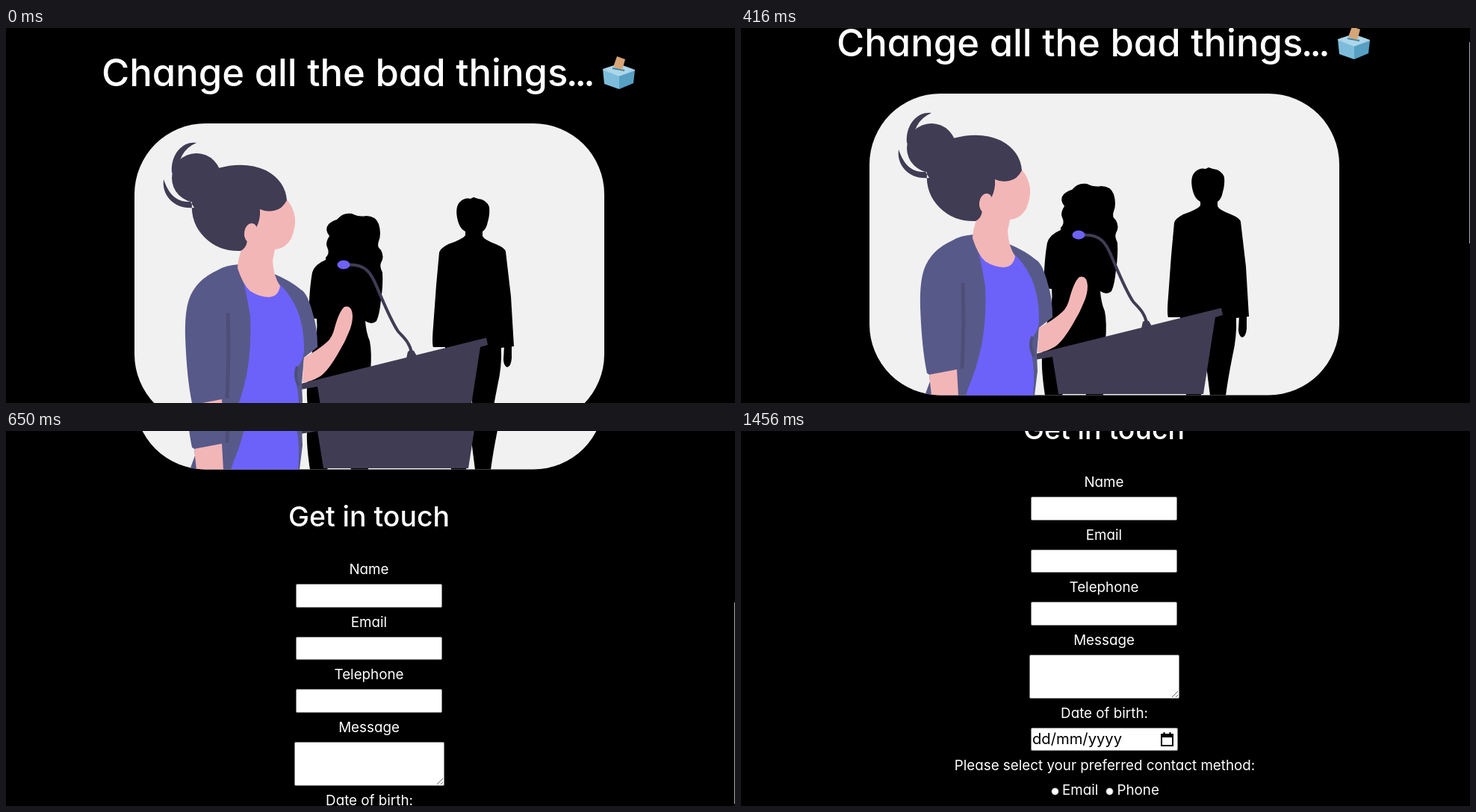
Recreate the animation shown at these times as an HTML page with a canvas. Size 976x503 px, loop 1.82 s.

```html
<!DOCTYPE html>
<html lang="en">
<head>
<meta charset="utf-8">
<title>Contact page scroll</title>
<style>
  html, body { margin: 0; width: 100%; height: 100%; overflow: hidden; background: #000; }
  #stage { position: relative; width: 976px; height: 503px; overflow: hidden; }
  #page, #page > * { position: absolute; left: 0; top: 0; }
  #thumb { position: absolute; left: 975px; top: 0; width: 1px; height: 270px; background: #aaa; }
  text {
    font: 400 18.8px Inter, "Open Sans", sans-serif;
    font-feature-settings: "cv11";
    font-optical-sizing: none;
    fill: #fff;
  }
  .mid { text-anchor: middle; }
  .title { font-size: 50.8px; font-weight: 500; }
  .dots { letter-spacing: -.075em; }
  .heading { font-size: 37.4px; font-weight: 500; }
  .date { font-size: 20.2px; fill: #000; }
</style>
</head>
<body>
<div id="stage">
  <div id="page">
    <canvas id="art" width="976" height="1101"></canvas>
    <svg width="976" height="1101">
      <text class="title" x="128" y="78">Change all the bad things</text>
      <text class="title dots" x="750" y="78">...</text>
      <text class="heading mid" x="486" y="609">Get in touch</text>
      <text class="mid" x="486" y="673">Name</text>
      <text class="mid" x="486" y="744">Email</text>
      <text class="mid" x="486" y="814">Telephone</text>
      <text class="mid" x="486" y="885">Message</text>
      <text class="mid" x="486.5" y="983">Date of birth:</text>
      <text class="date" x="390" y="1018">dd/mm/yyyy</text>
      <text class="mid" x="487" y="1053">Please select your preferred contact method:</text>
      <text x="430" y="1086">Email</text>
      <text x="503.5" y="1086">Phone</text>
    </svg>
  </div>
  <div id="thumb"></div>
</div>
<script>
const ctx = document.getElementById('art').getContext('2d');
const page = document.getElementById('page');
const thumb = document.getElementById('thumb');

const INK = '#403c54', SKIN = '#f3b6b7', VIOLET = '#6c62fa', JACKET = '#575a89', FOLD = '#4d4f79';

function fill(color, d) {
  ctx.fillStyle = color;
  ctx.fill(new Path2D(d));
}

function stroke(color, width, d) {
  ctx.strokeStyle = color;
  ctx.lineWidth = width;
  ctx.stroke(new Path2D(d));
}

function oval(color, x, y, rx, ry = rx, turn = 0) {
  ctx.fillStyle = color;
  ctx.beginPath();
  ctx.ellipse(x, y, rx, ry, turn, 0, 7);
  ctx.fill();
}

function drawBallotBox() {
  fill('#acd7ea', 'M799 55L820 48L842 56L821 64Z');
  fill('#7dbddb', 'M799 55L821 64V82L801 75Z');
  fill('#589fc4', 'M842 56L821 64V82L840 74Z');
  stroke('#c5e6f2', 1, 'M799 55.5L821 64L842 56.5');
  stroke('#477f9c', 2, 'M812 54L828 57');
  fill('#d5a477', 'M818 38L829 42L825 56L813 52Z');
}

function drawMan() {
  fill('#000', `M606 262C602 250 602 238 608 233Q614 227 622 229L626 227L632 229Q643 230 647 240
    Q648 250 645 260Q643 270 638 273V279Q640 284 656 290Q668 295 669 300L676 360L680 427L663 429
    Q664 455 658 480Q652 510 649 533H628L620 470L616 533H596L588 428H572Q570 424 572 400
    L576 345L580 301Q581 296 592 290Q612 283 615 278V273Q609 270 606 262Z`);
  fill('#000', 'M667 427H677V443Q676 454 671 455Q666 453 666 444Z');
}

function drawWoman() {
  fill('#000', `M428 308Q434 302 430 294Q427 288 433 279Q426 270 432 263Q438 258 443 257Q451 247 463 249
    Q473 254 482 252Q495 252 499 263Q503 276 499 286Q496 293 502 298Q507 307 502 315Q500 320 504 328
    Q505 345 502 365Q500 385 496 393Q490 399 481 393Q482 408 487 420Q490 435 488 460L485 533H462
    L450 480L430 533H407Q402 500 403 482Q404 455 411 430Q418 410 416 390L405 389Q406 350 410 328
    Q413 317 428 311Z`);
}

function drawPodium() {
  stroke(INK, 4, 'M459 317.5C482 317 489 329 496 346C507 372 515 392 525 407C532 415 541 422 543 436');
  oval(VIOLET, 452, 317.5, 8.5, 6);
  fill(INK, `M536 443L538 434Q542 431 546 433L550 440Z
    M395 477L643 415.5L645 425L635 428L619 531H425L417 481L394 485Z`);
}

function drawSpeaker() {
  // Jacket
  fill(JACKET, `M312 317Q294 318 283 325Q254 338 245 364Q239 382 240 415Q242 470 249 503L252 505L253 514
    L246 533H393L397 500L396 477L399 442L417 428Q417 402 411 384Q404 356 395 351Q381 339 357 329Z`);
  stroke(FOLD, 5, 'M297 382Q299 440 296 497');
  fill(SKIN, 'M252 505L289 498L291 533H255Z');

  // Shirt
  fill(VIOLET, `M314 325Q321 350 327 386Q329 430 322 466Q315 498 305 521L301 533H391Q394 500 389 478
    Q386 466 391 454Q400 443 399 428Q399 400 389 376Q378 353 364 342Z`);
  stroke(FOLD, 4, 'M390 454Q385 467 392 480');

  // Neck and face
  fill(SKIN, `M322 287L317 292Q310 311 310 322Q317 344 327 353Q340 361 352 361Q365 360 367 346
    Q358 333 357 312L360 297Q374 296 382 282Q388 268 387 255Q385 240 375 229L338 243Z`);

  // Hair
  oval(INK, 255, 201, 33);
  fill(INK, `M255 154C237 151 220 169 222 194L230 200Q229 165 255 154Z
    M211 203C208 225 226 244 252 241L247 233C228 234 218 223 211 203Z
    M284 188Q320 178 348 191Q374 205 376 231Q370 243 359 245Q348 247 340 243Q341 257 335 268
    L323 285Q322 295 314 299Q285 300 266 281Q247 262 249 235L250 215Z`);
  oval(SKIN, 328, 275, 9, 13, .12);

  // Raised hand
  fill(SKIN, `M399 442Q418 432 430 421Q437 415 440 402Q446 380 453 374Q463 371 464 386Q464 397 459 408
    Q454 421 446 434Q432 459 421 467Q406 476 397 475Z`);
}

function drawCard() {
  ctx.save();
  ctx.beginPath();
  ctx.roundRect(172, 128, 629, 404.5, 95);
  ctx.fillStyle = '#f1f1f1';
  ctx.fill();
  ctx.clip();
  drawMan();
  drawWoman();
  drawPodium();
  drawSpeaker();
  ctx.restore();
}

function drawField(x, y, w, h) {
  ctx.beginPath();
  ctx.roundRect(x + .5, y + .5, w - 1, h - 1, 1.5);
  ctx.fillStyle = '#fff';
  ctx.fill();
  ctx.strokeStyle = '#858585';
  ctx.lineWidth = 1;
  ctx.stroke();
}

function drawForm() {
  drawField(388, 686, 196, 32);
  drawField(388, 757, 196, 31);
  drawField(388, 827, 196, 32);
  drawField(386, 898, 201, 59);
  drawField(388, 996, 197, 31);
  stroke('#666', 1, 'M577 955L585 947M582 955L585 952');

  // Calendar icon
  stroke('#000', 2, 'M563 1005H578V1020H563Z M566.5 1002V1006M574.5 1002V1006');
  fill('#000', 'M562 1004H579V1009H562Z');

  for (const x of [420.5, 493.5]) {
    oval('#858585', x, 1081.5, 5);
    oval('#fff', x, 1081.5, 4.2);
  }
}

drawBallotBox();
drawCard();
drawForm();

const LOOP = 1820;
const SCROLL_END = 910;
const scrollSteps = [[0, 0], [260, 40], [520, 426], [650, 481], [780, 598]];
const start = performance.now();

function render() {
  const t = (performance.now() - start) % LOOP;
  const scroll = scrollSteps.findLast(([time]) => t >= time)[1];
  page.style.transform = `translateY(${-scroll}px)`;
  thumb.style.transform = `translateY(${Math.round(scroll * .478)}px)`;
  thumb.style.visibility = scroll && t < SCROLL_END ? 'visible' : 'hidden';
  requestAnimationFrame(render);
}
render();
</script>
</body>
</html>
```
